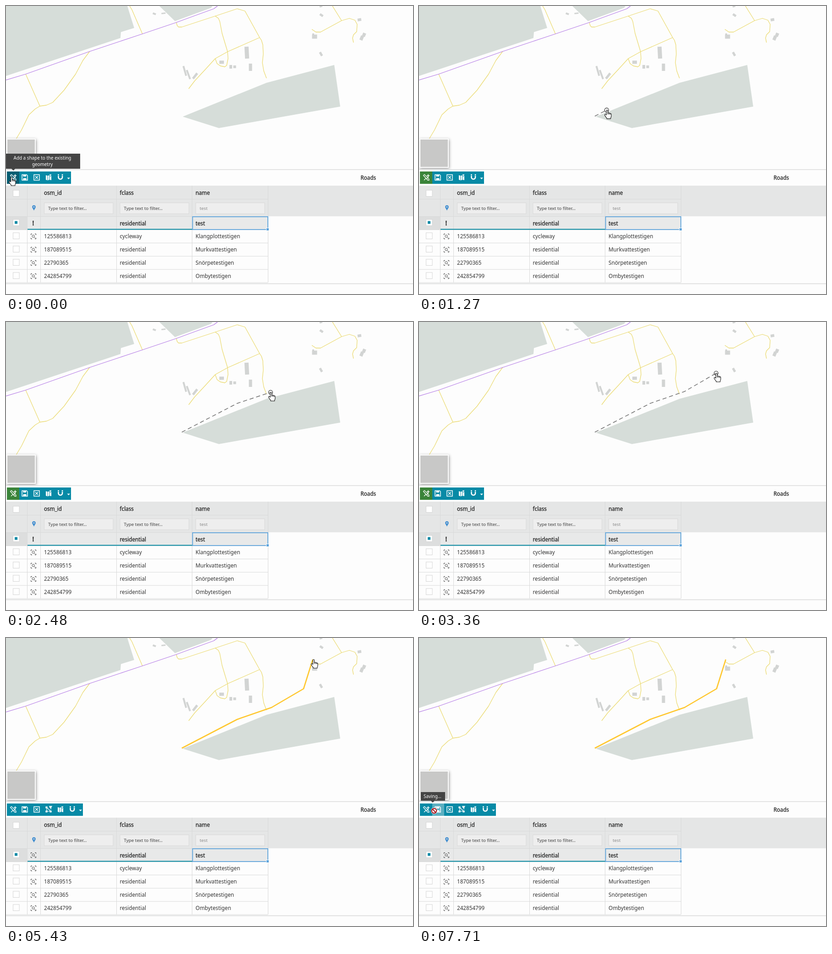
Write an HTML page that moves like this. It is 889x630 px and loops after 8 s.

```html
<!DOCTYPE html>
<html lang="en">
<head>
<meta charset="utf-8">
<title>Draw a road</title>
<style>
html, body { margin: 0; width: 100%; height: 100%; overflow: hidden; background: #fdfdfd; }
svg { display: block; width: 889px; height: 630px; }
text { font: 11.7px "Noto Sans", "Open Sans", sans-serif; fill: #333; }
.strong { fill: #222; stroke: #222; stroke-width: .3; }
.hint { font-size: 9.8px; fill: #666; stroke: #666; stroke-width: .25; }
.faint { font-size: 9.8px; fill: #888; }
.tip text { font-size: 9.9px; fill: #fff; }
.tip rect, .tip path { fill: #444; }
.line { fill: none; stroke-linejoin: round; }
.icon { fill: none; stroke: #fff; stroke-width: 1.5; }
</style>
</head>
<body>
<svg id="stage" viewBox="0 0 889 630">
  <defs>
    <filter id="shade" x="-20%" y="-20%" width="150%" height="150%">
      <feDropShadow dx="1" dy="2" stdDeviation="3" flood-opacity=".4"/>
    </filter>
    <g id="scan" fill="none" stroke="#444" stroke-width="1">
      <path d="M-5.5-3V-5.5H-3M3-5.5H5.5V-3M5.5 3V5.5H3M-3 5.5H-5.5V3M1.5 1.5L4 4"/>
      <circle cx="-.5" cy="-.5" r="2.6"/>
    </g>
  </defs>
  <rect width="889" height="630" fill="#fdfdfd"/>
  <g fill="#d6ddd9">
    <path d="M0 0H265L280 48L251 57L250 70L0 153Z"/>
    <path d="M335 0H451L448 4L369 33Z"/>
    <path d="M386 242L569 168L717 129L730 220L465 267Z"/>
  </g>
  <g id="buildings" fill="#d2d4d3"></g>
  <g class="line" stroke="#ecdc76" stroke-width="1.3">
    <path d="M270 0L275 8L298 61M43 149L74 219"/>
    <path d="M183 99L168 119L152 149L127 184L102 211L88 217L74 219L64 225L50 238L34 271L22 291"/>
    <path d="M372 36L374 43L377 46L384 46L457 22L505 6L522 11L554 69L558 75L561 85L562 105L560 124L563 142L569 158"/>
    <path d="M457 22L464 27L467 34L472 60L484 100L485 115L482 130L478 133L468 131L461 126L457 115"/>
    <path d="M554 69L484 100L457 115L437 137L412 164L399 181"/>
    <path d="M668 51L677 57H687L733 32L750 27L762 31L767 40L766 56L759 63L757 70L759 80M713 0L733 32"/>
  </g>
  <path class="line" d="M0 162L43 149L181 100L250 77L298 61L372 36L410 22L454 6L462 0" stroke="#b57ee6" stroke-width="1.3"/>
  <polyline id="draft" class="line" stroke="#777" stroke-width="1.6" stroke-dasharray="9 6"/>
  <polyline id="road" class="line" points="384,241 505,178 580,152 650,111 670,47" stroke="#ffc72f" stroke-width="2.6"/>
  <circle id="ring" r="4.5" fill="none" stroke="#333" stroke-width="1.1"/>

  <rect x="1" y="290" width="64" height="64" fill="#fff" filter="url(#shade)"/>
  <rect x="3" y="292" width="60" height="60" fill="#c8c8c7"/>

  <rect y="357" width="889" height="273" fill="#fdfdfd"/>
  <rect y="357" width="889" height="1.5" fill="#dcdcdc"/>
  <rect y="393" width="889" height="67" fill="#e5e6e6"/>
  <text class="strong" x="774.5" y="380">Roads</text>
  <g id="table"></g>
  <path d="M47 488.5H407" stroke="#0a8ba3" stroke-width="2"/>
  <rect x="407.5" y="461" width="164.5" height="28" fill="none" stroke="#60a5dc" stroke-width="1.8"/>
  <rect x="568.5" y="485.5" width="6" height="6" fill="#60a5dc" stroke="#fff"/>
  <path d="M61 447.5C59 443.5 57.2 442 57.2 439.6A3.8 3.8 0 0 1 64.8 439.6C64.8 442 63 443.5 61 447.5Z" fill="#438fd0"/>
  <circle cx="61" cy="439.6" r="1.3" fill="#e5e6e6"/>
  <path d="M0 607.5H889" stroke="#d8d8d8" stroke-width="1.5"/>
  <text id="unsaved" class="strong" x="57.5" y="480" style="font-size:14px;stroke-width:.6">!</text>
  <use id="located" href="#scan" x="60" y="475"/>

  <rect id="bar" x="2" y="362" height="27" fill="#078aa6"/>
  <rect id="addButton" x="2" y="362" width="27" height="27"/>
  <rect id="saveButton" x="29" y="362" width="26" height="27"/>
  <g class="icon">
    <g transform="translate(16 375)">
      <path d="M-6.5-4.5L3 6L6 6L5.5 3L-4-6.5ZM-1 2L-5 6M1 3L5-2" stroke-width="1.3"/>
      <path d="M4-7V-1M1-4H7" stroke-width="1.3"/>
    </g>
    <g transform="translate(41 375)">
      <path d="M-6-6H4L6-4V6H-6Z"/>
      <path d="M-3.5-5.5H3V-2H-3.5ZM-3.5 1.5H3.5V6H-3.5Z" fill="#fff" stroke="none"/>
    </g>
    <path d="M61 369H73V381H61ZM64 372L70 378M70 372L64 378"/>
    <g id="reshape" transform="translate(93 375)" stroke-width="1.2">
      <path d="M-4-4V4H5L-4-4M1-5H5V0"/>
      <path d="M-6-6h3v3h-3zM-6 3h3v3h-3zM3 3h3v3h-3zM2-7h5l-2.5 4z" fill="#fff"/>
    </g>
    <g id="tools">
      <path d="M87 370L91 371.5L95 370L99 371.5V381L95 380L91 381.5L87 380Z" fill="#fff" stroke="none"/>
      <path d="M91 371.5V381.5M95 370V380" stroke="#078aa6" stroke-width="1"/>
      <path d="M94 368H100L97 373Z" fill="#fff" stroke="#078aa6" stroke-width=".8"/>
      <path d="M114.5 368V374.5A4.3 4.3 0 0 0 123.1 374.5V368" stroke-width="2.6"/>
      <path d="M112.5 371H125.5" stroke="#078aa6" stroke-width="1"/>
      <path d="M133.5 375.5H140L136.7 379Z" fill="#fff" stroke="none"/>
    </g>
  </g>

  <g id="addTip" class="tip">
    <rect y="323" width="162" height="33"/><path d="M11 355H21L16 360Z"/>
    <text x="79.5" y="336" text-anchor="middle">Add a shape to the existing</text>
    <text x="79.5" y="350" text-anchor="middle">geometry</text>
  </g>
  <g id="saveTip" class="tip">
    <rect id="saveTipBox" x="4" y="337" height="19"/><path d="M25 355H35L30 360Z"/>
    <text id="saveTipText" x="10" y="350"></text>
  </g>

  <g id="pointer" stroke="#111" stroke-linejoin="round">
    <g id="hand" fill="#fff" stroke-width="1.1">
      <path d="M-1.6 10.8V1.4Q-1.6 0 0 0Q1.5 0 1.5 1.4V6.2Q3.9 5.4 4.2 7Q6.4 6.2 6.8 7.7Q9 7.2 9 9.6V13Q9 15.3 7.8 17V19H-.8V17.5Q-3 15.2-5 11.8Q-5.8 9.6-4.4 9.2Q-3.2 8.9-1.6 10.8Z"/>
      <path d="M1.5 6V9.5M4.2 7V9.8M6.8 7.7V10" fill="none"/>
    </g>
    <path id="arrow" d="M0 0V13.5L3.1 10.7L5.3 15.7L7.5 14.7L5.3 9.9H9.5Z" fill="#fff"/>
    <g id="denied">
      <circle r="7" fill="#fff" stroke="none"/>
      <circle r="5.2" fill="none" stroke="#a81820" stroke-width="2.2"/>
      <path d="M-3.7-3.7L3.7 3.7" stroke="#a81820" stroke-width="2.2"/>
    </g>
  </g>
</svg>
<script>
const LOOP = 8000;
const el = Object.fromEntries([...document.querySelectorAll('[id]')].map(e => [e.id, e]));

// x, y of the centre, width, height, turn
const buildings = [
  [324, 17, 7, 4, 20], [344, 16, 9, 3, -5], [390.5, 142, 4, 22, -16], [398.5, 150, 4, 21, -20],
  [413, 153, 5, 15, 38], [471, 123, 10, 7, 0], [491, 133, 6, 8, 0], [499.5, 133, 6, 6, 0],
  [526, 102, 9, 26, -3], [534, 134, 7, 16, 0], [674, 67, 11, 9, 0], [671, 62, 4, 4, 0],
  [688, 105, 5, 9, -30], [689, 20, 8, 5, 35], [688, 1, 6, 3, -15], [772, 30, 8, 6, -10],
  [777, 70, 7, 10, 22], [782, 63, 7, 8, 22]
];
el.buildings.innerHTML = buildings.map(([x, y, w, h, a]) =>
  `<rect x="${-w / 2}" y="${-h / 2}" width="${w}" height="${h}" transform="translate(${x} ${y}) rotate(${a})"/>`).join('');

const columns = [83, 248.5, 414];
const rows = [
  ['125586813', 'cycleway', 'Klangplottestigen'],
  ['187089515', 'residential', 'Murkvattestigen'],
  ['22790365', 'residential', 'Snörpetestigen'],
  ['242854799', 'residential', 'Ombytestigen']
];
const label = (x, y, s, cls = '') => `<text class="${cls}" x="${x}" y="${y}">${s}</text>`;
const rect = (x, y, w, h, fill, stroke = 'none') =>
  `<rect x="${x}" y="${y}" width="${w}" height="${h}" fill="${fill}" stroke="${stroke}"/>`;
const checkbox = y => rect(15.5, y - 6.5, 13.5, 13.5, '#fff', '#d5d5d5');
const texts = (y, cells, cls) => cells.map((s, i) => label(columns[i], y, s, cls)).join('');

function buildTable() {
  let out = rect(0, 460, 572, 29, '#e8e9e9') + rect(0, 460, 47, 29, '#dddede');
  out += '<path fill="none" stroke="#d9dada" d="M0 422.5H572M0 460.5H572M46.5 393V605M75.5 393V605'
    + 'M241.5 393V605M406.5 393V605M572.5 393V605';
  for (let y = 489.5; y < 606; y += 28.9) out += `M0 ${y}H572`;
  out += '"/>' + checkbox(409.5) + checkbox(473.5) + rect(19, 470.5, 6, 6, '#078aa6');
  out += texts(413, ['osm_id', 'fclass', 'name'], 'strong');
  columns.forEach((x, i) => {
    out += rect(x + .5, 430.5, 150.5, 24, '#eeeeee', '#d9d9d9');
    out += label(x + 9, 446, i < 2 ? 'Type text to filter...' : 'test', i < 2 ? 'hint' : 'faint');
  });
  out += texts(479.5, ['', 'residential', 'test'], 'strong');
  rows.forEach((cells, i) => {
    const y = 504 + 29 * i;
    out += checkbox(y - 1.5) + `<use href="#scan" x="60" y="${y}"/>` + texts(y + 4.3, cells);
  });
  el.table.innerHTML = out;
}
buildTable();

// start, last step, steps, from, to, bend
const moves = [
  [530, 800, 5, [364, 217], [384, 241]],
  [1080, 1740, 10, [384, 241], [504, 179]],
  [1880, 2550, 10, [504, 179], [580, 153]],
  [2950, 3360, 7, [580, 153], [649, 112]],
  [3830, 4570, 11, [649, 112], [668, 53]],
  [4640, 4710, 2, [668, 53], [671, 47]],
  [5900, 6650, 12, [671, 47], [144, 424], [540, 330]],
  [6720, 7110, 7, [144, 424], [33, 378]]
];
const clicks = [[900, 384, 241], [1810, 505, 178], [2760, 580, 152], [3600, 650, 111]];

function cursorAt(t) {
  const move = moves.filter(m => m[0] <= t).pop();
  if (!move) return [12, 374];
  const [start, end, steps, from, to, bend] = move;
  const step = Math.min(steps - 1, Math.floor((t - start) / (end - start) * (steps - 1) + .001));
  const p = (step + 1) / steps;
  const e = start === 530 ? 1 - (1 - p) ** 3 : p * p * (3 - 2 * p);
  return from.map((a, i) => {
    const mid = bend ? bend[i] : (a + to[i]) / 2;
    return (1 - e) ** 2 * a + 2 * e * (1 - e) * mid + e * e * to[i];
  });
}

const show = (node, on) => { node.style.display = on ? '' : 'none'; };
const place = (node, [x, y]) => node.setAttribute('transform', `translate(${x.toFixed(1)} ${y.toFixed(1)})`);

function render(t) {
  const at = cursorAt(t), [x, y] = at;
  const done = t >= 5370, wide = t >= 5430, saving = t >= 7650;

  const denied = t >= 7710;
  const hand = !denied && (y < 358 || y < 390 && x < 168);
  show(el.denied, denied);
  show(el.hand, hand);
  show(el.arrow, !denied && !hand);
  place(el.pointer, hand && t >= 530 ? [x + 1, y] : at);

  show(el.ring, t >= 530 && !done);
  place(el.ring, t < 670 ? cursorAt(Math.max(530, t - 70)) : at);
  show(el.draft, t >= 1080 && !done);
  const fixed = clicks.filter(c => c[0] <= t).map(c => c.slice(1));
  el.draft.setAttribute('points', [...fixed, at].join(' '));
  show(el.road, done);
  show(el.unsaved, !done);
  show(el.located, done);

  el.bar.setAttribute('width', wide ? 166 : 140);
  show(el.reshape, wide);
  place(el.tools, [wide ? 26 : 0, 0]);
  show(el.addButton, !wide);
  el.addButton.setAttribute('fill', t < 130 ? '#075e72' : '#3a8439');
  show(el.saveButton, t > 6720 && y < 390 && x < 55);
  el.saveButton.setAttribute('fill', t < 7510 ? '#075e72' : '#5cafc1');

  show(el.addTip, t < 260);
  el.addTip.style.opacity = t < 130 ? 1 : .5;
  show(el.saveTip, t >= 7110);
  el.saveTipBox.setAttribute('width', saving ? 53 : 76);
  el.saveTipText.textContent = saving ? 'Saving...' : 'Save changes';
}

const began = performance.now();
function tick() {
  render((performance.now() - began) % LOOP);
  requestAnimationFrame(tick);
}
tick();
</script>
</body>
</html>
```
